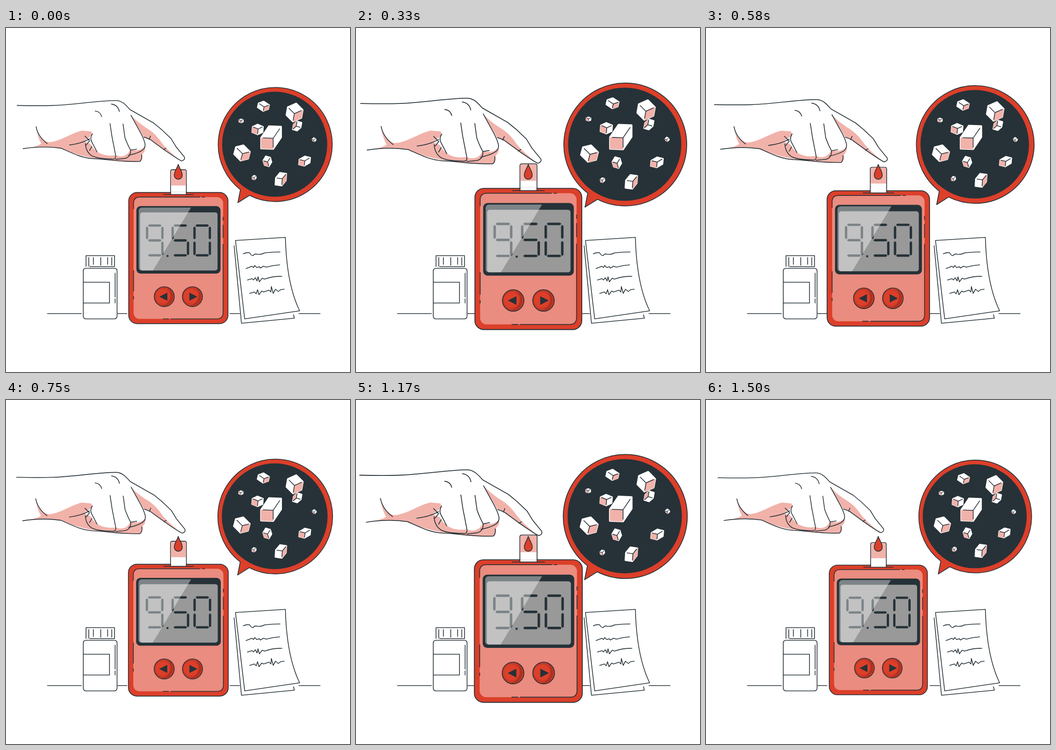
An HTML page for the animation above (1540 ms loop, 748x748 px).

```html
<!DOCTYPE html>
<html lang="en">
<head>
<meta charset="utf-8">
<title>Glucose meter</title>
<style>
  html, body { margin: 0; width: 100%; height: 100%; overflow: hidden; background: #fff; }
  svg { display: block; width: 100vw; height: 100vh; }
  .ln { fill: none; stroke: #263238; stroke-width: 1.6; stroke-linecap: round; stroke-linejoin: round; }
  .box { fill: #fff; stroke: #263238; stroke-width: 1.6; stroke-linejoin: round; }
  .red { fill: #dc3f2a; }
  .skin { fill: #f1b2aa; }
  .dark { fill: #263238; }
</style>
</head>
<body>
<svg viewBox="0 0 748 748">
  <path class="ln" d="M90 621H164M243 621H263M487 621H508M637 621H683"/>

  <g id="bottle">
    <path class="ln" d="M182 518.7H236V495H174V518.5M180 499V518M190 499V514M206 499V516M221 499V514M230 499V516"/>
    <rect class="box" x="168" y="522.5" width="73.5" height="110" rx="5.5"/>
    <path class="ln" d="M168 552.7H225V598H168M237.3 533V585M237.3 589V598"/>
  </g>

  <g id="paper">
    <path class="box" d="M496 473L512 642L627 631L625 623"/>
    <path class="box" d="M499 462L607.5 455.3C609 515 617 571 638.5 615L519 632.5Z"/>
    <path class="ln" d="M516 491Q524 487 530 489Q533 495 537 495Q541 490 546 492Q556 493 562 489Q578 487 596 487
      M522 523L535 518L538 521L541 516.5L545 521L551 519L553 522L560 518L566 520Q580 516 595 515
      M525 548L535 545L538 548L542 543L546 550L548 541L551 552L557 544L562 546Q582 539 600 540
      M530 577L540 574L544 578L547 569L550 580L556 572L560 574L572 570L576 574L577 562L581 577L586 568L592 573L597 569L605 568"/>
  </g>

  <g id="meter">
    <path class="box" d="M358 364V314Q358 310 362 310H388Q392 310 392 314V364Z"/>
    <path class="skin" d="M358.8 344V314Q358.8 310.8 362 310.8H388Q391.2 310.8 391.2 314V344Z"/>
    <rect class="red" x="268" y="359" width="213.5" height="282" rx="18" stroke="#263238" stroke-width="1.7"/>
    <path class="box" d="M358.8 358H391.2V363H358.8Z" style="stroke:none"/>
    <path class="ln" d="M343 363.5H407M358 358V363M392 358V363"/>
    <rect x="278.5" y="368.8" width="192.5" height="262" rx="13" fill="#ea8c7f"/>
    <path class="ln" d="M278.5 394V382Q278.5 368.8 292 368.8H421M426 368.8H431
      M471 412V419M471 429V456M471 470V617Q471 630.8 458 630.8H359M342 630.8H354
      M278.5 527V571M278.5 583V588"/>
    <rect class="dark" x="284.5" y="388.3" width="181" height="145" rx="9"/>
    <rect x="292.5" y="401.7" width="166.5" height="125" rx="5" fill="#999"/>
    <g id="digits" class="dark"></g>
    <path d="M289.5 399Q289.5 391.5 297 391.5H402L320 526.7H296Q289.5 526.7 289.5 520Z" fill="#fff" fill-opacity=".4"/>
    <g id="keys"></g>
  </g>

  <g id="bubble">
    <path class="red" d="M510.5 350.5A122.7 122.7 0 1 1 530 362.8L505 378.5Z" stroke="#263238" stroke-width="1.6" stroke-linejoin="round"/>
    <circle class="dark" cx="584.3" cy="252.8" r="113"/>
    <g id="cubes"></g>
  </g>

  <g id="hand">
    <path fill="#fff" d="M26 169Q75 170 105 169C145 168 205 158 240 158.5C252 159 260 168 269 178L320 207L357 240L386 281Q386 289 378 288L342 264L301 239L303 258L295 274Q297 288 290 289.5C250 292 170 284 121 261L39 262Z"/>
    <path class="skin" d="M67 215C70 233 80 247 96 248C120 246 143 228 166 223L186 225L188 233L170 246L184 252C194 270 212 280 237 276
      C250 281 262 278 267 268L270 264C284 268 296 264 301 257Q304 266 295 274Q297 287 290 289.5C250 292 170 285 121 261C98 257 74 257 55 260C64 257 74 255 78 251Q70 238 67 215Z"/>
    <path class="skin" d="M271 190Q281 202 302 216C318 225 328 236 337 249C348 264 360 272 376 287L342 264L312 242L298 236Z"/>
    <path class="ln" d="M26 169Q75 170 105 169C145 168 205 158 240 158.5C252 159 260 168 269 178L320 207L337 221L357 240L368 258L386 280Q388 286 380 288.5Q372 285 342 264L312 242Q305 239 299 237
      M271 190L289 223Q297 237 300 247Q305 260 293 267Q282 273 266 276
      M39 262C65 258 95 257 121 261C148 273 165 282 190 283.5C220 284 248 291 290 289.5Q295 286 294 275
      M67 215Q71 236 91 251
      M254 209L258 238Q263 252 270 265Q271 280 258 283L238 285
      M226 208L230 235L238 276Q240 286 228 284Q202 284 188 278Q174 270 173 251
      M139 254Q164 251 182 241M188 230Q182 240 187 248L198 269M172 235L182 245L175 254M187 257L182 266M270 265L283 263
      M194 181Q205 182 208 193M229 166Q243 168 246 182M313 235L310 242M346 261L341 264"/>
  </g>

  <path class="red" d="M374.6 296.5C377 305 383.3 311 383.3 320.2A8.7 8.7 0 0 1 365.9 320.2C365.9 311 372.2 305 374.6 296.5Z" stroke="#263238" stroke-width="1.6" stroke-linejoin="round"/>
</svg>

<script>
const $ = id => document.getElementById(id);
const pts = list => list.map(p => p.map(n => n.toFixed(2)).join(",")).join(" ");
const add = (...v) => v.reduce((a, b) => [a[0] + b[0], a[1] + b[1]]);
const mul = (v, k) => [v[0] * k, v[1] * k];

// Seven-segment digits
const ROWS = [430, 462, 494], HALF = 2.5;

function segment(x, y, len, upright) {
  const p = [[0, 0], [HALF, -HALF], [len - HALF, -HALF], [len, 0], [len - HALF, HALF], [HALF, HALF]];
  return `<polygon points="${pts(p.map(([u, v]) => upright ? [x + v, y + u] : [x + u, y + v]))}"/>`;
}

function digit(x, on) {
  const w = 33, parts = {
    a: [x + 2, ROWS[0], w - 4], g: [x + 2, ROWS[1], w - 4], d: [x + 2, ROWS[2], w - 4],
    f: [x, ROWS[0] + 2, 28, 1], b: [x + w, ROWS[0] + 2, 28, 1],
    e: [x, ROWS[1] + 2, 30, 1], c: [x + w, ROWS[1] + 2, 30, 1]
  };
  return [...on].map(k => segment(...parts[k])).join("");
}

$("digits").innerHTML = digit(307.5, "abcdfg") + digit(362.5, "acdfg") + digit(409.5, "abcdef") +
  '<rect x="349.5" y="493.5" width="4" height="4"/>';

// Round keys with arrows
const key = (x, dir) => `<g transform="translate(${x} 583)">
  <circle r="21.5" fill="#c93a27"/>
  <path d="M5 -20.9A21.5 21.5 0 0 1 -8 20A23 23 0 0 0 5 -20.9Z" fill="#b03020"/>
  <circle class="red" cx="-3" cy="-1" r="15.5"/>
  <circle class="ln" r="21.5"/>
  <path class="dark" d="M${10.5 * dir} 0L${-6.5 * dir} -8.6V8.6Z"/></g>`;
$("keys").innerHTML = key(344.5, -1) + key(405, 1);

// Each cube: near corner, three edge vectors, index of the shaded face
const CUBES = [
  [561.5, 172.5, -12, -8, 11, -4, -2, 9, 1],
  [630.5, 214, 2, -11, 10, 3, -8, 7, 2],
  [626.5, 187, -14, -14, 18, -8, -3, 17, 1],
  [548.5, 220, -12, -5, 11, -5, -1, 12, 2],
  [581, 240, -26, -1, 17, -25, 0, 23, 2],
  [515, 273, -14, -14, 16, -4, -4, 15, 1],
  [569, 291, -10, -3, 6, -10, 3, 10, 2],
  [649, 288.5, -12, -3, 12, -7, -1, 11, 2],
  [600.5, 327, -14, -2, 9, -11, -1, 15, 1],
  [512, 202, -5, -2, 5, -2, 0, 5, 2],
  [668, 244, -4, -2, 4, -4, 2, 4, 2],
  [540, 324.5, -5, -1, 4, -4, 1, 5, 2]
];

function cube([x, y, ax, ay, bx, by, cx, cy, shade]) {
  const v = [x, y], e = [[ax, ay], [bx, by], [cx, cy]];
  const size = Math.hypot(ax, ay), pad = Math.min(5, size * .28);
  const rim = [0, 1, 2].flatMap(i => [add(v, e[i]), add(v, e[i], e[(i + 1) % 3])]);
  const p = e[shade], q = e[(shade + 1) % 3];
  const face = [v, add(v, p), add(v, p, q), add(v, q)];
  const mid = add(v, mul(add(p, q), .5));
  const inset = face.map(f => add(mul(f, .91), mul(mid, .09)));
  const rays = e.map(d => "M" + pts([v]) + "L" + pts([add(v, mul(d, .82))])).join("");
  return `<polygon points="${pts(rim)}" fill="#fff" stroke="#fff" stroke-width="${pad * .7}" stroke-linejoin="round"/>
    <polygon class="skin" points="${pts(inset)}" stroke="#f1b2aa" stroke-width="${pad * .6}" stroke-linejoin="round"/>
    <path class="ln" style="stroke-width:${size < 8 ? 1 : 1.5}" d="${rays}"/>`;
}
$("cubes").innerHTML = CUBES.map(cube).join("");

// Double pulse: [step, growth] with a smooth curve between
const LOOP = 1540, STEPS = 37;
const BEAT = [[0, .011], [8, .089], [9.6, .1], [14, .044], [18, .017], [19.6, .01],
  [24, .044], [26, .077], [28, .0994], [28.6, .1], [36, 0], [37, .011]];

function slope(i) {
  if (i === 0 || i === BEAT.length - 1) return .011;
  const [a, b, c] = BEAT.slice(i - 1, i + 2);
  const l = (b[1] - a[1]) / (b[0] - a[0]), r = (c[1] - b[1]) / (c[0] - b[0]);
  return l * r <= 0 ? 0 : 2 * l * r / (l + r);
}

function growth(step) {
  let i = 0;
  while (i < BEAT.length - 2 && BEAT[i + 1][0] <= step) i++;
  const [x0, y0] = BEAT[i], [x1, y1] = BEAT[i + 1];
  const h = x1 - x0, u = (step - x0) / h, w = 1 - u;
  return w * w * (1 + 2 * u) * y0 + u * u * (3 - 2 * u) * y1 +
    h * u * w * (w * slope(i) - u * slope(i + 1));
}

const PIVOTS = { hand: [206, 224.3], meter: [374.7, 475.5], bubble: [584.3, 254] };

function draw(ms) {
  const step = Math.floor(((ms + 5) % LOOP) * STEPS / LOOP);
  const s = 1 + growth(step);
  for (const id in PIVOTS) {
    const [x, y] = PIVOTS[id];
    $(id).setAttribute("transform", `translate(${x} ${y}) scale(${s.toFixed(5)}) translate(${-x} ${-y})`);
  }
}

let start = null;
function tick(now) {
  if (start === null) start = now;
  draw(now - start);
  requestAnimationFrame(tick);
}
draw(0);
requestAnimationFrame(tick);
</script>
</body>
</html>
```
